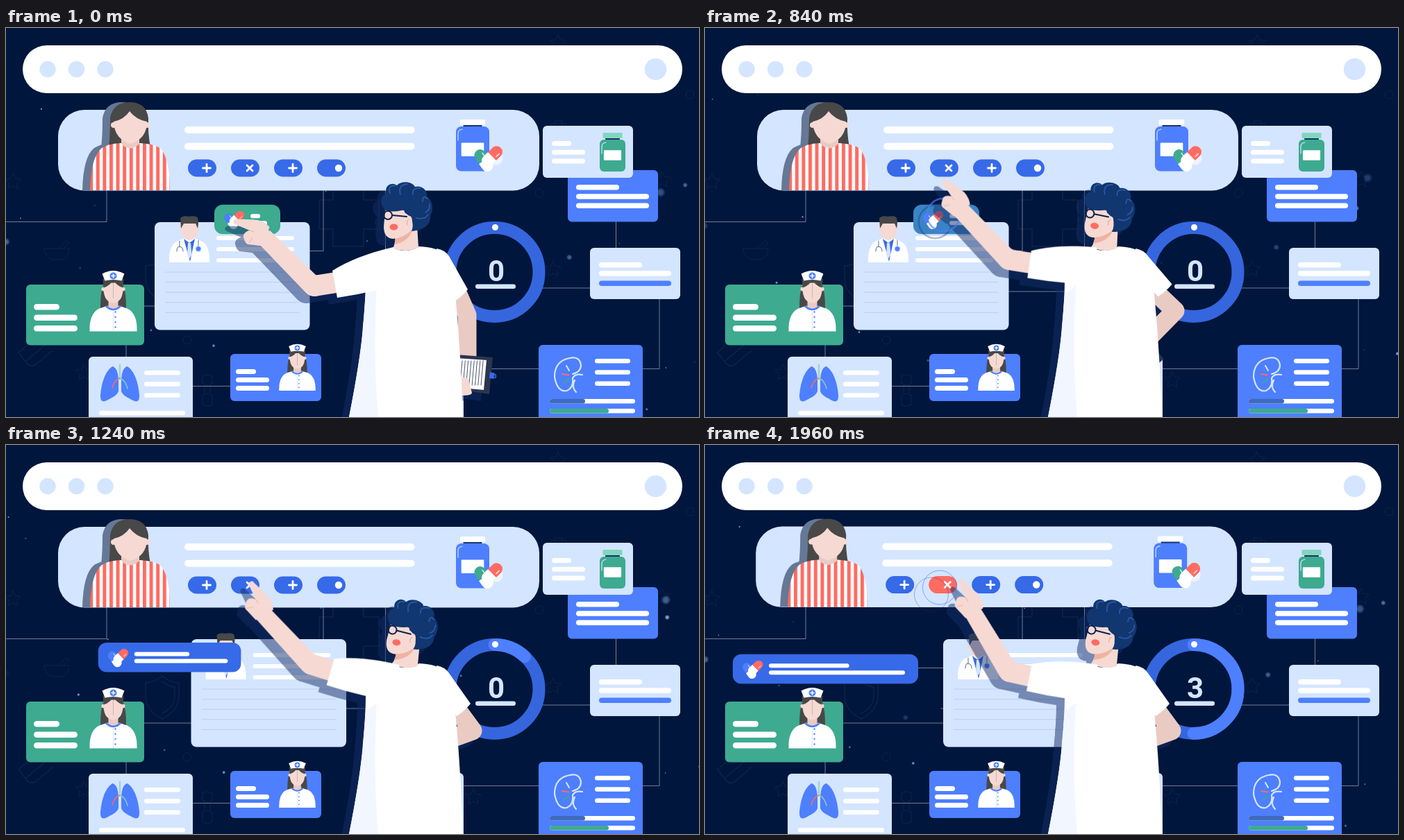
Recreate the animation shown at these times as an HTML page. Size 998x561 px, loop 2000 ms.

```html
<!DOCTYPE html>
<html lang="en">
<head>
<meta charset="utf-8">
<style>
html, body { margin: 0; width: 100%; height: 100%; overflow: hidden; background: #00163c; }
svg { display: block; width: 998px; height: 561px; }
#man { filter: drop-shadow(-12px 10px 0 rgba(20, 46, 104, .5)); }
#woman { filter: drop-shadow(-11px 0 0 #657895); }
</style>
</head>
<body>
<svg id="stage" viewBox="0 0 998 561" xmlns="http://www.w3.org/2000/svg"></svg>
<script>
const WHITE = '#fff', PALE = '#d4e5ff', BLUE = '#4d7fff', DEEP = '#376ae8', GREEN = '#3eaa90', RED = '#ff6b62',
  SKIN = '#f6d9d3', BACKSKIN = '#eacbc3', HAIR = '#484848', NAVY = '#12366f', FAINT = '#10244a', FRAME = '#0c2350';

// Markup helpers
const box = (x, y, w, h, fill, r = 6, more = '') =>
  `<rect x="${x}" y="${y}" width="${w}" height="${h}" rx="${r}" fill="${fill}" ${more}/>`;
const bar = (x, y, w, h = 7.5, fill = WHITE, more = '') => box(x, y, w, h, fill, h / 2, more);
const bars = (x, y, step, h, ...widths) => widths.map((w, i) => bar(x, y + i * step, w, h)).join('');
const dot = (x, y, r, fill, more = '') => `<circle cx="${x}" cy="${y}" r="${r}" fill="${fill}" ${more}/>`;
const shape = (d, fill) => `<path d="${d}" fill="${fill}"/>`;
const line = (d, color, w = 1, more = '') =>
  `<path d="${d}" fill="none" stroke="${color}" stroke-width="${w}" stroke-linecap="round" stroke-linejoin="round" ${more}/>`;
const group = (id, body) => `<g id="${id}">${body}</g>`;
const move = (x, y, body, more = '') => `<g transform="translate(${x} ${y}) ${more}">${body}</g>`;
const mirror = body => body + `<g transform="scale(-1 1)">${body}</g>`;
const repeat = (n, make) => Array.from({ length: n }, (_, i) => make(i)).join('');

const star = (x, y, r = 12) => line('M' + Array.from({ length: 10 }, (_, i) => {
  const a = (i / 5 - .5) * Math.PI, q = i % 2 ? r / 2 : r;
  return `${x + q * Math.cos(a)} ${y + q * Math.sin(a)}`;
}).join('L') + 'Z', FAINT);

const capsule = (x, y, turn, color) => move(x, y,
  shape('M-8.5 0V9a8.5 8.5 0 0 0 17 0V0Z', WHITE) + shape('M-8.5 0V-9a8.5 8.5 0 0 1 17 0V0Z', color) +
  line('M4.500 -10V-4', WHITE, 1.2), `rotate(${turn})`);
const pills = (x, y, scale, color) => move(x, y,
  capsule(-7, 4, -35, color) + capsule(5, -2, 46, RED), `scale(${scale})`);

const bottle = (x, y, w, h, fill, cap) =>
  box(x + w * .22, y + 6, w * .56, 9, '#17346f', 0) +
  box(x, y + 10, w, h - 10, fill, w * .16) +
  box(x + w * .12, y, w * .76, 8, cap, 1.5) +
  box(x + w * .16, y + h * .45, w * .68, h * .26, WHITE, 1) +
  line(`M${x + 3} ${y + 30}v-10q0 -5 6 -6`, PALE, 1.2);

const nurse = (x, y, scale) => move(x, y,
  shape('M-18.500 -32Q-19 -80 0 -80Q19 -80 18.500 -32Z', HAIR) + box(-7, -48, 14, 18, BACKSKIN, 2) +
  mirror(shape('M0 0H-34Q-35 -26 -20 -33L-8 -37Q-4 -31 0 -31Z', WHITE)) +
  line('M-10 -36Q0 -27 10 -36', BLUE, 2.5) +
  mirror(shape('M0 -70H-14V-60Q-13 -42 0 -41Z', SKIN) + dot(-14, -61, 3, SKIN) +
    shape('M0 -76H-15L-14 -63Q-4 -66 0 -75Z', HAIR)) +
  shape('M-12 -73L-16 -83Q0 -92 16 -83L12 -73Q0 -76 -12 -73Z', WHITE) +
  dot(0, -80, 5, BLUE) + line('M-2.500 -80h5M0 -82.500v5', WHITE, 1.5) +
  line('M0 -30V-1', PALE, .8) + repeat(4, i => dot(3, -28 + i * 7.3, 1.2, BLUE)), `scale(${scale})`);

const backdrop = star(10, 222) + star(945, 219) + star(795, 22) + star(788, 348) + star(673, 508) + star(112, 497) +
  line('M55 318H91Q90 332 80 334H66Q56 330 55 318M76 317L87 307L91 310L84 317', FAINT) +
  line('M225 333Q237 343 249 343V364Q247 384 225 395Q203 384 201 364V343Q213 343 225 333M225 341Q235 349 243 349V364Q241 379 225 387', FAINT, 1.4) +
  line('M471 226H515V248H537V290H515V315H471V290H451V248H471Z', FAINT, 1.6) +
  line('M18 468L45 445Q53 440 57 448Q60 454 54 459L28 481ZM28 481Q34 490 42 486L67 465', FAINT, 1.4) +
  line('M283 502Q290 498 297 502V512Q290 518 283 512ZM286 516V526M294 516V526M283 530Q290 524 297 530V543Q290 548 283 543Z', FAINT, 1.2) +
  line('M785 165V138H807V165M790 138V134H801V138', FAINT) +
  line('M979 96a6 6 0 1 0 12 0a6 6 0 1 0 -12 0M762 238a6 6 0 1 0 12 0a6 6 0 1 0 -12 0M255 450a6 6 0 1 0 12 0a6 6 0 1 0 -12 0', FAINT);

const wires = line('M0 279.500H145V234M457 234V321.500H300M546.500 234V322M340 380H530M199 401H345M173 457V474' +
  'M268 516.500H323M772 375H841M878.500 279V317M941 391V491.500H917M655 491.500H767', '#8b98b1', .8);

const lungs = move(164, 486,
  mirror(shape('M-11 2Q-3 3 -2 22V38Q-4 44 -15 49Q-29 58 -28 43Q-25 12 -11 2Z', BLUE)) +
  line('M0 0V20', '#9dd3d0', 2.5) + line('M0 19Q-8 22 -11 33', RED, 1.6) + line('M0 19Q8 22 11 34', '#80cbb9', 1.6));

const kidney = line('M816 499Q828 496 828 486Q826 473 812 476Q790 480 790 503Q794 526 808 523Q818 518 816 505Q819 498 830 500M819 508Q814 518 821 525', PALE, 2.2) +
  line('M801 499L810 500.500', RED, 2) + line('M803 512L811 506', GREEN, 2) + line('M807 487L811 494', PALE, 2);

const progress = (y, w, color) => bar(783, y, 123, 6.5) + bar(783, y, w, 6.5, color);

const cards =
  box(29, 370, 170, 87.5, GREEN) + bars(40, 398, 15.5, 8.5, 37, 63, 63) + nurse(154.5, 437.5, 1) +
  box(119, 474, 150, 100, PALE) + bars(199, 494, 16.2, 6.5, 52, 52, 52) + bar(134, 552, 124, 6.5) + lungs +
  box(323, 470, 131, 68, BLUE) + bars(331, 492, 12, 7, 29, 48, 48) + nurse(419.5, 523, .77) +
  box(809, 205, 130, 74.5, BLUE) + bars(821, 226, 13.3, 7.5, 62, 105, 105) +
  box(773, 141, 130, 75, PALE) + bars(786, 163, 12.8, 7, 28, 48, 48) + bottle(855, 151, 37, 56, GREEN, '#82d6bf') +
  box(841, 317, 130, 74, PALE) + bars(854, 338, 12.3, 7.5, 62, 104) + bar(854, 364.5, 104, 7.5, BLUE) +
  box(767, 457, 150, 120, BLUE) + bars(848, 477, 16.2, 6.5, 51, 51, 51) + kidney +
  progress(535, 51, '#3f6bbd') + progress(549, 85, GREEN) +
  box(560, 473, 99, 100, PALE);

const ring = dot(703.5, 352, 64, 'none', 'stroke="#3566de" stroke-width="18"') +
  line('M703.500 288a64 64 0 0 1 0 128a64 64 0 0 1 0 -128', BLUE, 18, 'id="arc" pathLength="360"') +
  dot(704.5, 287.5, 4.5, WHITE) + bar(676, 369.5, 58, 6.5, PALE) +
  `<text id="count" x="706" y="364.500" text-anchor="middle" fill="${PALE}" font-family="Roboto, 'Liberation Sans', sans-serif" font-weight="700" font-size="42">0</text>`;

const doctorCard = box(214, 280, 223.5, 155.5, PALE, 8) + bars(303, 300, 16, 6, 112, 112, 112) +
  repeat(5, i => line(`M230 ${352 + i * 14.6}h192`, '#bccbe6', .9)) +
  move(264, 338,
    box(-7, -40, 14, 16, BACKSKIN, 2) +
    mirror(shape('M0 0H-29Q-30 -25 -17 -31L-7 -35H0Z', WHITE) + dot(-12, -47, 2.5, SKIN)) +
    shape('M-8 -34L0 -28L8 -34L1 -1Z', DEEP) + shape('M-2 -28H2L3.500 -11L0 -5L-3 -11Z', PALE) +
    line('M-14 -31v9M-18 -16q0 -7 4 -7q5 1 5 7M13 -32v10', '#6b7b9a', 1.1) +
    dot(13, -19.5, 4, BLUE, `stroke="${PALE}"`) +
    shape('M-11.500 -58H12V-46Q11 -33 0 -32Q-11 -33 -11.500 -46Z', SKIN) +
    shape('M-12 -49L-13 -64Q-8 -68 -1 -66Q10 -68 12 -64Q14 -58 12 -49L9 -56H-8Z', HAIR));

// The four buttons are evenly spaced
const plus = 'M-5.500 0h11M0 -5.500v11', cross = 'M-4 -4l8 8M4 -4l-8 8';
const buttons = [plus, cross, plus, ''].map((icon, i) => move(262 + 62 * i, 189.5,
  bar(0, 0, 41, 25, DEEP, `id="button${i}"`) +
  move(27, 12.5, icon ? line(icon, WHITE, 2.8) : dot(4, 0, 5.2, WHITE)))).join('');

const woman =
  shape('M148 172Q150 155 150 130Q154 107 178 107Q202 107 205 130Q204 150 208 172Z', HAIR) +
  shape('M121 234Q122 186 138 173Q147 167 165 166H193Q214 167 223 174Q236 190 236 234Z', 'url(#stripes)') +
  shape('M166 155H192V167Q179 180 166 167Z', BACKSKIN) +
  shape('M178 120Q187 132 203 135Q203 160 179 167Q156 160 155 135Q170 132 178 120Z', SKIN) +
  dot(155, 140, 4, SKIN) + dot(203, 140, 4, SKIN);

const panel = box(75, 118, 693, 116.5, PALE, 38) + bars(257, 142, 23.7, 10, 331.5, 331.5) + buttons +
  bottle(648, 132, 48, 74.5, BLUE, WHITE) + dot(706, 188, 9.5, '#eef4ff') + pills(695, 187, 1, GREEN) + group('woman', woman);

const head =
  shape('M560 290L592 285L594 316Q578 325 557 318Q562 310 560 290Z', SKIN) +
  shape('M561 302Q576 300 586 290Q580 308 560 312Z', '#eeb3a2') +
  shape('M547 255L544 286Q544 303 557 304Q574 303 586 289L588 255Z', SKIN) +
  shape('M546 263C537 253 539 241 548 239C544 228 555 221 563 227C569 220 585 221 589 229C599 226 608 235 606 243C615 249 616 262 611 271C612 285 600 292 584 293Q588 284 583 273Q577 268 574 266Q574 262 570 263Q556 266 546 263Z', NAVY) +
  line('M553 238Q549 227 561 227M568 240Q564 226 578 225M586 240Q584 230 597 231M600 250Q600 240 607 246M604 266Q611 262 610 254M591 274Q603 277 608 269', '#2859a8', 1.8) +
  shape('M578 271Q585 269 585 279Q584 290 576 289Q571 283 578 271Z', SKIN) + line('M580 276Q576 279 578 284', '#dfa696') +
  `<ellipse cx="558.500" cy="287" rx="6" ry="4.500" fill="${RED}"/>` +
  line('M556 270L577 272', FRAME, 2) + dot(550, 270, 6, 'none', `stroke="${FRAME}" stroke-width="2"`);

const board =
  shape('M-16 57L37 61L32 114L-18 107Z', '#2b3550') + shape('M-16 62L28 65L24 108L-18 104Z', WHITE) +
  repeat(8, i => line(`M${-7 + i * 4.3} 66l-3 35`, '#39445c', .9)) +
  shape('M33 82L40 84L38 92L32 91Z', DEEP) + dot(39, 88, 2.5, 'none', `stroke="${DEEP}" stroke-width="1.500"`) +
  shape('M-10 92Q-4 88 2 92L7 112Q7 116 -8 116Q-14 108 -10 92Z', SKIN);

const hand = dot(0, 0, 11.5, SKIN) +
  shape('M16 -4Q17 -18 6 -29L-10 -46Q-16 -49 -17 -43L-8 -21Q-19 -26 -22 -18Q-27 -10 -22 -6L-10 9Z', SKIN) +
  line('M-8 -21l3 6M-21 -9l8 -1', '#e6b9ad');

const arm = line('M444 372L482 366', SKIN, 30) +
  move(444, 372, group('forearm',
    shape('M2 -16L-64 -80L-82 -63L-12 10Q-4 17 6 14L10 -12Z', SKIN) + move(-73, -71, group('hand', hand)))) +
  shape('M558 316Q505 328 470 350L477 389Q505 385 534 378L575 350Z', WHITE);

const man =
  line('', BACKSKIN, 27, 'id="backArm"') + group('board', board) + `<path id="backSleeve" fill="${WHITE}"/>` +
  shape('M556 317Q578 326 595 315Q622 316 634 328L646 375Q653 440 658.500 561H494Q511 475 514 430Q518 390 518 362Z', WHITE) +
  shape('M534 372L518 384Q515 420 514 436Q509 485 494 561H536Q528 470 534 372Z', '#f2f6ff') +
  group('head', head) + dot(0, 0, 0, 'none', `id="ripple" stroke="${BLUE}" opacity=".65"`) + group('arm', arm);

// Drifting specks, seeded so every loop is alike
let seed = 11;
const random = () => (seed = seed * 16807 % 2147483647) / 2147483647;
const motes = Array.from({ length: 26 }, () => ({
  x: random() * 998, y: 95 + random() * 466, vx: random() * 60 - 20, vy: random() * 60 - 30,
  r: 1.2 + 7 * random() ** 3, phase: random() * 2000
}));

const stage = document.getElementById('stage');
stage.innerHTML = `<defs>
<pattern id="stripes" x="120.200" width="9.600" height="9" patternUnits="userSpaceOnUse"><rect width="9.600" height="9" fill="${WHITE}"/><rect width="5" height="9" fill="${RED}"/></pattern>
<radialGradient id="glow"><stop offset=".4" stop-color="#86b4ee"/><stop offset="1" stop-color="#86b4ee" stop-opacity="0"/></radialGradient>
</defs>` + box(0, 0, 998, 561, '#00163c', 0) + backdrop + wires +
  group('motes', motes.map(m => dot(m.x, m.y, m.r, 'url(#glow)')).join('')) +
  box(24, 25, 950, 69, WHITE, 34.5) + repeat(3, i => dot(60 + i * 41.5, 59.5, 11.7, PALE)) + dot(935.5, 59.5, 15.7, PALE) +
  cards + ring + group('doctor', doctorCard) +
  group('tab', box(0, 0, 95, 42.5, GREEN, 12, 'id="tabBox"') + pills(29, 21, .72, BLUE) +
    bar(52, 13.5, 14, 6, WHITE, 'id="short"') + bar(52, 23.5, 24, 6, WHITE, 'id="long"')) +
  group('panel', panel) + group('man', man);

const $ = id => document.getElementById(id);
const set = (id, attrs) => { for (const k in attrs) $(id).setAttribute(k, attrs[k]); };
const part = (t, from, to) => Math.min(1, Math.max(0, (t - from) / (to - from)));
const ease = (t, from, to) => { const u = part(t, from, to); return u * u * (3 - 2 * u); };
const blend = (a, b, u) => `color-mix(in srgb, ${b} ${u * 100}%, ${a})`;

function drawMotes(t) {
  motes.forEach((m, i) => {
    const u = (t + m.phase) % 2000 / 1000 - 1, c = $('motes').children[i];
    c.setAttribute('transform', `translate(${m.vx * u} ${m.vy * u})`);
    c.setAttribute('opacity', Math.cos(u * Math.PI / 2) * (m.r > 4 ? .5 : .9));
  });
}

// A disc that grows and hollows out into a thin ring
function drawRipple(x, y, age) {
  const outer = 25 * (1 - Math.exp(-age / 60)), inner = Math.min(outer, age / 25);
  set('ripple', { cx: x, cy: y, r: Math.max(0, outer + inner) / 2, 'stroke-width': age > 0 ? outer - inner : 0 });
}

function drawSlides(t) {
  const p = part(t, 948, 1402), w = 95 + 172 * p;
  set('tab', { transform: `translate(${300 - 260 * p} ${254.7 + 47 * p})` });
  set('tabBox', { width: w });
  $('tabBox').style.fill = blend(GREEN, DEEP, part(t, 720, 920));
  set('short', { width: (w - 71) * .59 });
  set('long', { width: w - 71 });
  set('doctor', { transform: `translate(${127 * p * p + 2 * part(t, 1400, 1480)} 0)` });
  const swipe = 2.4 * part(t, 1840, 2000);
  set('panel', { transform: `translate(${-swipe} ${-swipe / 4})` });
  $('button1').style.fill = blend(DEEP, RED, part(t, 1480, 1600));
}

function drawRing(t) {
  const turn = 180 * part(t, 1140, 1400) ** 1.5;
  set('arc', { 'stroke-dasharray': `${turn} 400`, opacity: turn > 0 ? 1 : 0 });
  $('count').textContent = Math.max(0, Math.floor((t - 1480) / 150));
}

function drawMan(t) {
  const raise = ease(t, 640, 960), settle = ease(t, 1040, 1240), push = ease(t, 1640, 1960);
  const lift = 26.5 * raise - 5 * push, tilt = 2 * raise + 12 * push;
  const point = -45 * (1 - ease(t, 0, 320)) - 12 * ease(t, 320, 640) + 8 * settle;
  set('head', { transform: `rotate(${9 * raise} 575 310)` });
  set('arm', { transform: `rotate(${lift} 560 335)` });
  set('forearm', { transform: `rotate(${tilt - lift})` });
  set('hand', { transform: `rotate(${point - tilt})` });

  // The other arm swings the board behind the back
  const x = 664 + 19 * raise - 11 * settle, y = 414 - 9 * raise + 7 * settle, bend = 65 * raise + 5 * settle;
  const b = bend * Math.PI / 180, sx = 665 + 11 * raise - 7 * settle, sy = 377 - 11 * raise + 7 * settle;
  set('backArm', { d: `M650 382L${x} ${y}l${-62 * Math.sin(b)} ${62 * Math.cos(b)}` });
  set('board', { transform: `translate(${x} ${y}) rotate(${bend})` });
  set('backSleeve', { d: `M620 318Q632 320 638 329L${sx} ${sy}q-8 10 -20 18L628 360Z` });
}

const start = performance.now();
function frame() {
  const t = Math.floor((performance.now() - start) % 2000 / 40) * 40;
  drawMotes(t);
  drawSlides(t);
  drawRing(t);
  drawMan(t);
  if (t < 1360) drawRipple(343.5, 269.5, t - 280); else drawRipple(338, 205.5, t - 1360);
  requestAnimationFrame(frame);
}
frame();
</script>
</body>
</html>
```
